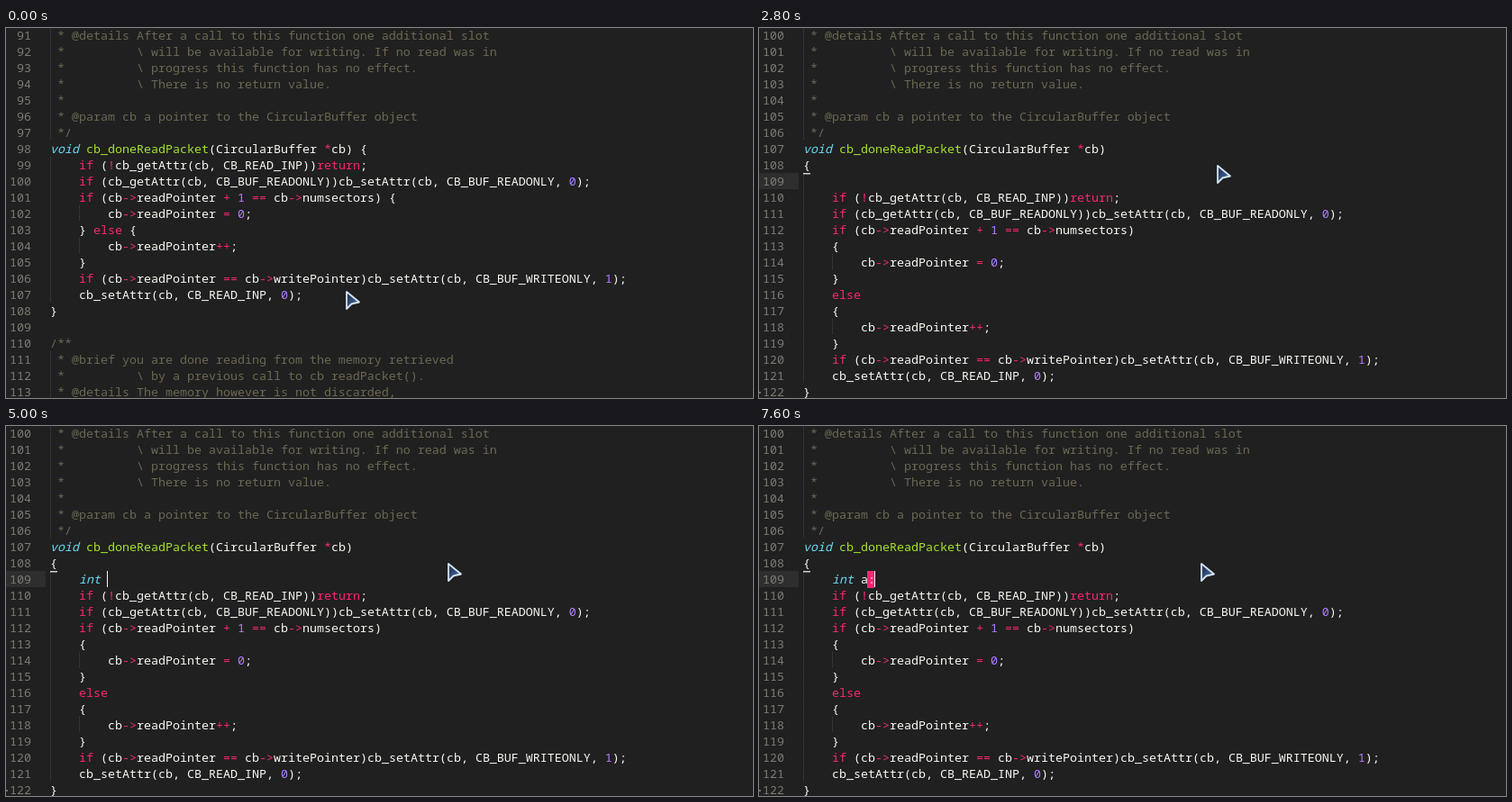
Animation of 829x411 px, one loop 8000 ms. Source, as an HTML page:

```html
<!DOCTYPE html>
<html lang="en">
<head>
<meta charset="utf-8">
<title>Code editor</title>
<style>
html, body { margin: 0; width: 100%; height: 100%; overflow: hidden; background: #202020; }
svg { display: block; width: 829px; height: 411px; }
text { font: 13.333px "Noto Sans Mono", "DejaVu Sans Mono", monospace; white-space: pre; fill: #f8f8f2; }
.num { fill: #7b7b74; text-anchor: end; }
.comment { fill: #6c6853; }
.key { fill: #f92672; }
.type { fill: #66d9ef; font-style: italic; }
.func { fill: #a6e22e; }
.lit { fill: #ae81ff; }
.item { fill: #444; }
.item .hit { fill: #000; font-weight: bold; }
.guide { stroke: #464640; stroke-dasharray: 1 1; }
</style>
</head>
<body>
<svg viewBox="0 0 829 411">
  <defs>
    <linearGradient id="pick" x2="0" y2="1">
      <stop offset="0" stop-color="#b3c9e9"/>
      <stop offset=".45" stop-color="#a3bce0"/>
      <stop offset=".5" stop-color="#8faad3"/>
      <stop offset="1" stop-color="#7b98c9"/>
    </linearGradient>
    <linearGradient id="arrow" x2="1" y2="1">
      <stop offset=".2" stop-color="#26395a"/>
      <stop offset="1" stop-color="#4c78b4"/>
    </linearGradient>
  </defs>
  <rect width="829" height="411" fill="#202020"/>
  <g id="code"></g>
  <g id="popup"></g>
  <path id="mouse" d="M1 1V20L6.5 14.5L15 12.5Z" fill="url(#arrow)" stroke="#d3e3f3" stroke-width="1.8" stroke-linejoin="round"/>
</svg>
<script>
(() => {
const LOOP = 8000, STEP = 200, ROW = 18, COL = 8, LEFT = 49;
const $ = id => document.getElementById(id);

const intro = String.raw` * @details After a call to this function one additional slot
 *          \ will be available for writing. If no read was in
 *          \ progress this function has no effect.
 *          \ There is no return value.
 *
 * @param cb a pointer to the CircularBuffer object
 */`.split('\n');

const body = String.raw`void cb_doneReadPacket(CircularBuffer *cb) {
    if (!cb_getAttr(cb, CB_READ_INP))return;
    if (cb_getAttr(cb, CB_BUF_READONLY))cb_setAttr(cb, CB_BUF_READONLY, 0);
    if (cb->readPointer + 1 == cb->numsectors) {
        cb->readPointer = 0;
    } else {
        cb->readPointer++;
    }
    if (cb->readPointer == cb->writePointer)cb_setAttr(cb, CB_BUF_WRITEONLY, 1);
    cb_setAttr(cb, CB_READ_INP, 0);
}
`.split('\n');

const outro = String.raw`/**
 * @brief you are done reading from the memory retrieved
 *          \ by a previous call to cb readPacket().
 * @details The memory however is not discarded,`.split('\n');

const compact = [...intro, ...body, ...outro];

// Moves every brace of the function onto its own line.
const expanded = [...intro, ...body.flatMap(line => {
  const pad = line.match(/^ */)[0];
  if (line.endsWith('} else {')) return [pad + '}', pad + 'else', pad + '{'];
  return line.endsWith(' {') ? [line.slice(0, -2), pad + '{'] : [line];
})];

// [start, typed text, caret column or -1 when blinked off, popup]
const typing = [
  [2600, '', 4], [2800, '', -1], [3000, '', 4],
  [3400, 'i', 5], [3600, 'in', 6], [3800, 'int', 7],
  [4000, 'int', 7, 'int'], [4200, 'int', -1, 'int'], [4400, 'int', 7, 'int'], [4600, 'int', -1, 'int'],
  [5000, 'int ', 8], [5200, 'int a', 9, 'a'], [5400, 'int a', -1, 'a'], [5600, 'int a', 9],
  [5800, 'int a=', 10], [6000, 'int a=', -1], [6400, 'int a= ', 11], [6600, 'int a= ', -1],
  [6800, 'int a=', 10], [7200, 'int a', 9], [7400, 'int a:', -1], [7600, 'int a:', 10]
];

const popups = {
  int: { x: 75, items: ['*in*s*t*antiate', '*in*valida*t*e', 'cb_*in*i*t*'] },
  a: { x: 107, scroll: true, items: ['', 're', 'ttribute', 'vailable', 'll', 'dditional', 'nd', 'ny'].map(s => '*a*' + s) }
};

const mousePath = [
  [0, 377, 292], [1200, 336, 215], [1800, 319, 169],
  [2200, 566, 152], [2400, 545, 152], [3000, 490, 152]
];

const esc = s => s.replace(/&/g, '&amp;').replace(/</g, '&lt;').replace(/>/g, '&gt;');
const span = (cls, s) => `<tspan class="${cls}">${esc(s)}</tspan>`;
const rect = (x, y, w, h, fill, more = '') => `<rect x="${x}" y="${y}" width="${w}" height="${h}" fill="${fill}" ${more}/>`;
const label = (x, y, content, cls = '') => `<text x="${x}" y="${y}" class="${cls}">${content}</text>`;
const rowTop = row => row * ROW - 1;

const TOKEN = /(\b(?:if|else|return)\b|->|\+\+|==|[=+!*])|\b(void|int)\b|\b(cb_doneReadPacket)\b|\b(\d+)\b/g;
function paint(line) {
  if (/^( \*|\/\*\*)/.test(line)) return span('comment', line);
  let out = '', last = 0;
  for (const m of line.matchAll(TOKEN)) {
    const cls = m[1] ? 'key' : m[2] ? 'type' : m[3] ? 'func' : 'lit';
    out += esc(line.slice(last, m.index)) + span(cls, m[0]);
    last = m.index + m[0].length;
  }
  return out + esc(line.slice(last));
}

function drawRow(line, row, number) {
  const y = rowTop(row), indent = line.match(/^ */)[0].length;
  let out = label(28, y + 14, number, 'num');
  for (let c = 0; c < indent; c += 4) {
    out += `<path class="guide" d="M${LEFT + c * COL + .5} ${y}v${ROW}"/>`;
  }
  const bad = line.indexOf(':');
  if (bad >= 0) out += rect(LEFT + bad * COL - 1, y, COL, 19, '#f92672');
  return out + label(LEFT, y + 14, paint(line));
}

function drawPopup({ x, items, scroll }) {
  const h = items.length * 20, w = scroll ? 284 : 300;
  let out = rect(x, 179, 304, h + 4, '#444') + rect(x + 2, 181, 300, h, '#222') +
    rect(x + 2, 181, w, h, '#f0f0f0') + rect(x + 2, 181, w, 20, 'url(#pick)');
  if (scroll) out += rect(x + 290, 185, 8, 63, '#555', 'rx="4"');
  items.forEach((item, i) => {
    const content = item.split('*').map((s, j) => j % 2 ? span('hit', s) : esc(s)).join('');
    out += label(x + 6, 195 + i * 20, content, 'item');
  });
  return out;
}

function stateAt(t) {
  if (t < 600) return { lines: compact, first: 91, braces: [] };
  if (t < 2000) return { lines: expanded, first: 100, row: 16, col: t < 1400 && t % 800 < 400 ? 5 : -1, braces: [16, 18] };
  if (t < 2600) return { lines: expanded, first: 100, row: 8, col: t < 2400 ? 1 : -1, braces: [8, 21] };
  const [, text, col, popup] = typing.filter(s => s[0] <= t).pop();
  const lines = [...expanded];
  lines.splice(9, 0, '    ' + text);
  return { lines, first: 100, row: 9, col, popup, braces: [8, 22] };
}

function mouseAt(t) {
  const i = mousePath.findIndex(p => p[0] > t);
  if (i < 0) return mousePath.at(-1).slice(1);
  const a = mousePath[i - 1], b = mousePath[i], k = (t - a[0]) / (b[0] - a[0]);
  return [a[1] + (b[1] - a[1]) * k, a[2] + (b[2] - a[2]) * k];
}

function render(t) {
  const { lines, first, row, col, braces, popup } = stateAt(t);
  let out = row ? rect(0, rowTop(row), 44, ROW, '#2e2e2e') : '';
  out += lines.map((line, i) => drawRow(line, i, first + i)).join('');
  for (const b of braces) {
    const x = LEFT + lines[b].search(/\S/) * COL;
    out += rect(x, rowTop(b) + ROW, COL, 1.5, '#d0d0ca');
  }
  if (braces.length) out += rect(0, rowTop(braces[1]) + 9, 2, 2, '#75715e');
  if (col >= 0) out += rect(LEFT - 1 + col * COL, rowTop(row), 1, ROW, '#f8f8f0');
  $('code').innerHTML = out;
  $('popup').innerHTML = popup ? drawPopup(popups[popup]) : '';
  $('mouse').setAttribute('transform', `translate(${mouseAt(t).map(Math.round)})`);
}

let shown = -1;
function tick() {
  const t = Math.floor(performance.now() % LOOP / STEP) * STEP;
  if (t !== shown) render(shown = t);
  requestAnimationFrame(tick);
}
tick();
})();
</script>
</body>
</html>
```
